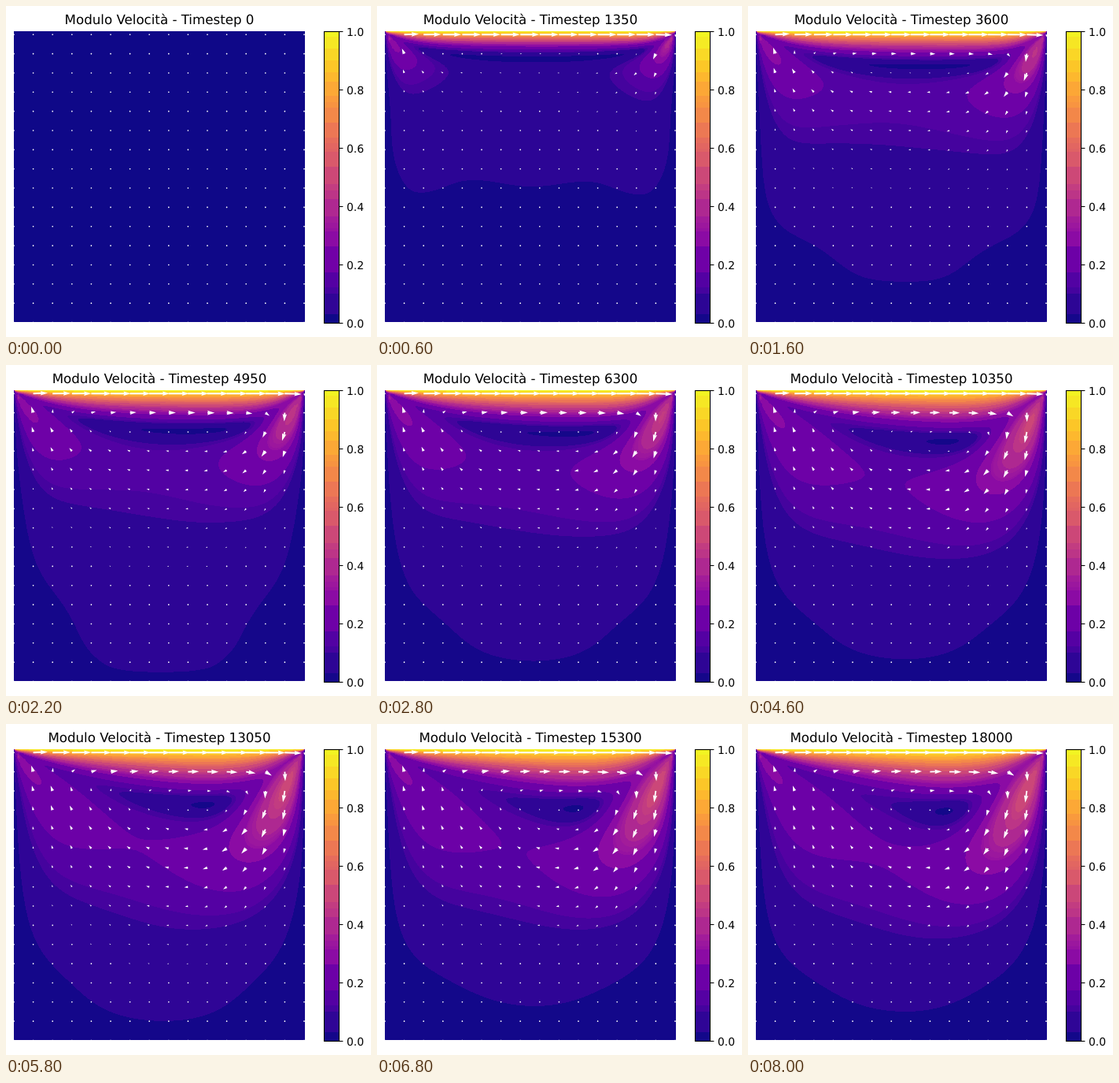
An HTML page with a canvas for the animation above (8200 ms loop, 464 px wide and 420 px high).

```html
<!DOCTYPE html>
<html lang="it">
<head>
<meta charset="utf-8">
<title>Modulo Velocità</title>
<style>
html, body { margin: 0; width: 100%; height: 100%; overflow: hidden; background: #fff; }
canvas, svg { position: absolute; left: 0; top: 0; display: block; }
text { font-family: "DejaVu Sans", Verdana, sans-serif; fill: #000; text-rendering: geometricPrecision; }
</style>
</head>
<body>
<canvas id="field" width="464" height="420"></canvas>
<svg width="464" height="420" viewBox="0 0 464 420">
  <clipPath id="plot"><rect x="10" y="32" width="370" height="369"/></clipPath>
  <text id="title" x="195" y="23" font-size="16.67" text-anchor="middle"></text>
  <path id="arrows" fill="#fff" clip-path="url(#plot)"/>
  <g id="ticks" stroke-width="1.1"></g>
</svg>
<script>
const WIDTH = 464, HEIGHT = 420;
const LEFT = 10, TOP = 32, PLOT_W = 370, PLOT_H = 369.6;
const BAR = { left: 405, right: 423, top: 33, bottom: 402 };
const FRAME_MS = 200, FRAMES = 41, STEPS_PER_FRAME = 450;

const $ = id => document.getElementById(id);

// Lid-driven cavity: D2Q9 lattice Boltzmann on N x N cells with a ghost border.
// Lattice time runs COARSE times faster than the displayed step count.
const COARSE = 4, N = 98, P = N + 2, CELLS = P * P;
const LID = 0.04, REYNOLDS = 100;
const RATE = 1 / (3 * LID * N / REYNOLDS + 0.5);
const CX = [0, 1, 0, -1, 0, 1, -1, -1, 1];
const CY = [0, 0, 1, 0, -1, 1, 1, -1, -1];
const OPPOSITE = [0, 3, 4, 1, 2, 7, 8, 5, 6];
const WEIGHT = CX.map((c, q) => [4 / 9, 1 / 9, 1 / 36][Math.abs(c) + Math.abs(CY[q])]);
const OFFSET = CX.map((c, q) => c + CY[q] * P);

let pop = new Float64Array(9 * CELLS), nextPop = new Float64Array(9 * CELLS);
WEIGHT.forEach((w, q) => pop.fill(w, q * CELLS, (q + 1) * CELLS));

// Each link that crosses a wall reflects its opposite; the lid adds momentum.
const links = [];
for (let j = 1; j <= N; j++) {
  for (let i = 1; i <= N; i++) {
    for (let q = 1; q < 9; q++) {
      const gi = i - CX[q], gj = j - CY[q];
      if (gi > 0 && gi <= N && gj > 0 && gj <= N) continue;
      const cell = j * P + i;
      links.push({
        to: q * CELLS + cell - OFFSET[q],
        from: OPPOSITE[q] * CELLS + cell,
        push: gj > N ? 6 * WEIGHT[q] * CX[q] * LID : 0
      });
    }
  }
}

const local = new Float64Array(9);
function advance() {
  for (const { to, from, push } of links) pop[to] = pop[from] + push;
  for (let j = 1; j <= N; j++) {
    for (let k = j * P + 1; k <= j * P + N; k++) {
      let rho = 0, u = 0, v = 0;
      for (let q = 0; q < 9; q++) {
        const f = local[q] = pop[q * CELLS + k - OFFSET[q]];
        rho += f;
        u += f * CX[q];
        v += f * CY[q];
      }
      u /= rho;
      v /= rho;
      const base = 1 - 1.5 * (u * u + v * v);
      for (let q = 0; q < 9; q++) {
        const c = 3 * (CX[q] * u + CY[q] * v);
        nextPop[q * CELLS + k] = local[q] + RATE * (WEIGHT[q] * rho * (base + c + c * c / 2) - local[q]);
      }
    }
  }
  [pop, nextPop] = [nextPop, pop];
}

// Ghost values are mirrored so that interpolation meets the wall speed on the wall.
function snapshot(lid) {
  const u = new Float32Array(CELLS), v = new Float32Array(CELLS);
  for (let j = 1; j <= N; j++) {
    for (let k = j * P + 1; k <= j * P + N; k++) {
      let rho = 0, mx = 0, my = 0;
      for (let q = 0; q < 9; q++) {
        const f = pop[q * CELLS + k];
        rho += f;
        mx += f * CX[q];
        my += f * CY[q];
      }
      u[k] = mx / rho / LID;
      v[k] = my / rho / LID;
    }
  }
  for (const grid of [u, v]) {
    const top = (N + 1) * P, wall = grid === u ? 2 * lid : 0;
    for (let i = 1; i <= N; i++) {
      grid[i] = -grid[P + i];
      grid[top + i] = wall - grid[top - P + i];
    }
    for (let k = 0; k < CELLS; k += P) {
      grid[k] = -grid[k + 1];
      grid[k + N + 1] = -grid[k + N];
    }
  }
  return { u, v };
}

const states = [snapshot(0)];
let steps = 0;
function stateAt(frame) {
  while (states.length <= frame) {
    const goal = Math.round(states.length * STEPS_PER_FRAME / COARSE);
    for (; steps < goal; steps++) advance();
    states.push(snapshot(1));
  }
  return states[frame];
}

const clamp = t => Math.min(Math.max(t, 0), 1);
function sample(grid, x, y) {
  const gx = clamp(x) * N + 0.5, gy = clamp(y) * N + 0.5;
  const i = gx | 0, j = gy | 0, fx = gx - i, fy = gy - j, k = j * P + i;
  const low = grid[k] + (grid[k + 1] - grid[k]) * fx;
  const high = grid[k + P] + (grid[k + P + 1] - grid[k + P]) * fx;
  return low + (high - low) * fy;
}

// Plasma colour map, cut into contour bands.
const BANDS = 99, BLANK = 255;
const STOPS = ("0d0887 310597 4c02a1 6600a7 7e03a8 9511a1 aa2395 bc3587 cc4778 " +
  "da5a6a e66c5c f0804e f89540 fdac33 fdc527 f8df25 f0f921").split(" ")
  .map(hex => [0, 2, 4].map(i => parseInt(hex.substr(i, 2), 16)));
const bandColors = Array.from({ length: BANDS }, (_, band) => {
  const t = Math.floor((band + 0.5) / BANDS * 256) / 16, i = Math.floor(t);
  return STOPS[i].map((c, n) => Math.round(c + (STOPS[i + 1][n] - c) * (t - i)));
});
const bucketOf = ([r, g, b]) => (r >> 5) << 7 | (g >> 4) << 3 | b >> 5;

const bandMap = new Uint8Array(WIDTH * HEIGHT).fill(BLANK);
for (let y = BAR.top; y < BAR.bottom; y++) {
  const band = Math.floor((BAR.bottom - y - 0.5) / (BAR.bottom - TOP) * BANDS);
  bandMap.fill(band, y * WIDTH + BAR.left, y * WIDTH + BAR.right);
}

// Bands in the same coarse colour bucket share their mean, weighted by area.
function reducedPalette() {
  const counts = new Uint32Array(256), buckets = new Map();
  for (const band of bandMap) counts[band]++;
  bandColors.forEach((rgb, band) => {
    const key = bucketOf(rgb), sum = buckets.get(key) || [0, 0, 0, 0];
    rgb.forEach((c, n) => sum[n] += c * counts[band]);
    sum[3] += counts[band];
    buckets.set(key, sum);
  });
  const palette = new Uint32Array(256);
  bandColors.forEach((rgb, band) => {
    const sum = buckets.get(bucketOf(rgb));
    const [r, g, b] = sum.map(c => Math.round(c / sum[3]));
    palette[band] = 0xff000000 | b << 16 | g << 8 | r;
  });
  return palette;
}

const ctx = $("field").getContext("2d");
const image = ctx.createImageData(WIDTH, HEIGHT);
const pixels = new Uint32Array(image.data.buffer);

function drawField({ u, v }) {
  for (let row = 0; row < Math.floor(PLOT_H); row++) {
    for (let col = 0; col < PLOT_W; col++) {
      const x = (col + 0.5) / PLOT_W, y = 1 - (row + 0.5) / PLOT_H;
      const speed = Math.hypot(sample(u, x, y), sample(v, x, y));
      bandMap[(TOP + row) * WIDTH + LEFT + col] = Math.min(speed * BANDS, BANDS - 1);
    }
  }
  const palette = reducedPalette();
  bandMap.forEach((band, i) => pixels[i] = palette[band]);
  ctx.putImageData(image, 0, 0);
}

const SHAFT = 1.85, ARROW_SCALE = 29.6, HEAD = 5;

function arrowPath(x, y, u, v) {
  const speed = Math.hypot(u, v), length = speed * ARROW_SCALE / SHAFT;
  let points, unit = SHAFT, cos = 1, sin = 0;
  if (length < 1) {
    points = Array.from({ length: 6 }, (_, i) =>
      [Math.cos(i * Math.PI / 3) / 2, Math.sin(i * Math.PI / 3) / 2]);
  } else {
    const l = Math.max(length, HEAD);
    unit *= length / l;
    cos = u / speed;
    sin = -v / speed;
    points = [[0, -0.5], [l - 4.5, -0.5], [l - HEAD, -1.5], [l, 0],
      [l - HEAD, 1.5], [l - 4.5, 0.5], [0, 0.5]];
  }
  return "M" + points.map(([a, b]) =>
    (x + unit * (a * cos - b * sin)).toFixed(2) + " " +
    (y + unit * (a * sin + b * cos)).toFixed(2)).join("L") + "Z";
}

function drawArrows({ u, v }) {
  let d = "";
  for (let j = 0; j < 16; j++) {
    for (let i = 0; i < 16; i++) {
      const px = LEFT + 24.6 * i, py = 401.5 - 24.35 * j;
      const x = (px - LEFT) / PLOT_W, y = (TOP + PLOT_H - py) / PLOT_H;
      d += arrowPath(px, py, sample(u, x, y), sample(v, x, y));
    }
  }
  $("arrows").setAttribute("d", d);
}

function buildTicks() {
  let out = `<rect x="404.5" y="32.5" width="19" height="370" fill="none" stroke="#000"/>`;
  for (let i = 0; i <= 5; i++) {
    const y = 402.5 - 74 * i;
    out += `<path d="M423.5 ${y}h4.9" stroke="#000"/>` +
      `<text x="433" y="${y + 5}" font-size="13.89">${(i / 5).toFixed(1)}</text>`;
  }
  $("ticks").innerHTML = out;
}

let shown = -1;
function render(ms) {
  const frame = Math.floor(ms / FRAME_MS) % FRAMES;
  if (frame === shown) return;
  shown = frame;
  const state = stateAt(frame);
  $("title").textContent = "Modulo Velocità - Timestep " + frame * STEPS_PER_FRAME;
  drawField(state);
  drawArrows(state);
}

buildTicks();
const start = performance.now();
function tick() {
  render(performance.now() - start);
  requestAnimationFrame(tick);
}
tick();
</script>
</body>
</html>
```
